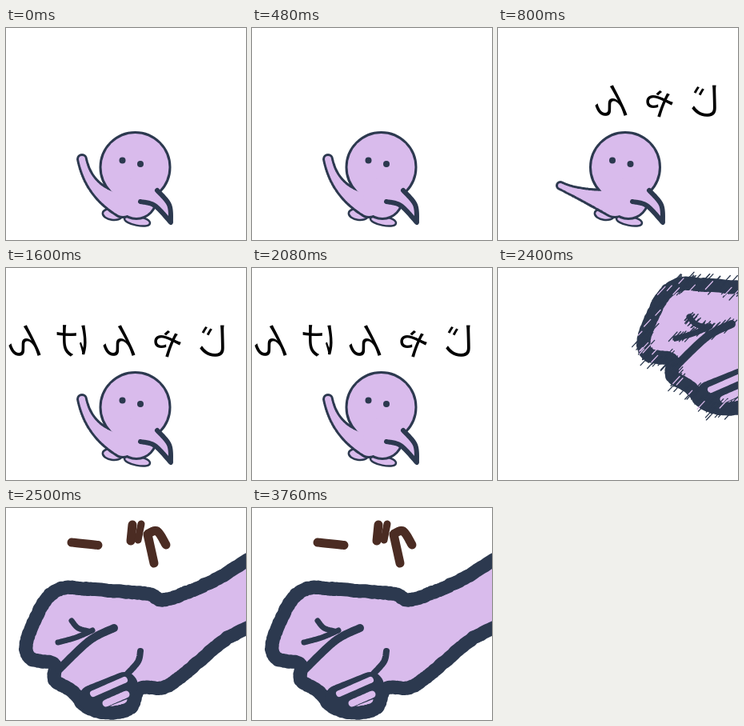
Animation of 300 by 265 pixels, one loop 4.6 s. Source, as an HTML page with a canvas:

```html
<!DOCTYPE html>
<html lang="ja">
<head>
<meta charset="utf-8">
<style>
html, body { margin: 0; height: 100%; overflow: hidden; background: #fff; }
canvas { display: block; }
</style>
</head>
<body>
<canvas width="300" height="265" role="img" aria-label="じゃんけん グー"></canvas>
<script>
const ctx = document.querySelector('canvas').getContext('2d');
const INK = '#2c394f', SKIN = '#d9bbec', BROWN = '#4b2c23';
ctx.lineCap = ctx.lineJoin = 'round';

const seeded = seed => () => (seed = seed * 16807 % 2147483647) / 2147483647;

// Dense points on a Catmull-Rom curve through "x,y x,y ...".
function spline(text, closed) {
  const p = text.split(' ').map(s => s.split(',').map(Number));
  const n = p.length, out = [];
  const at = i => closed ? p[(i + n) % n] : p[Math.max(0, Math.min(n - 1, i))];
  for (let i = 0; i < (closed ? n : n - 1); i++) {
    const [a, b, c, d] = [-1, 0, 1, 2].map(k => at(i + k));
    for (let t = 0; t < 1; t += 1 / 16)
      out.push([0, 1].map(k => b[k] + t / 2 * (c[k] - a[k]
        + t * (2 * a[k] - 5 * b[k] + 4 * c[k] - d[k] + t * (3 * (b[k] - c[k]) + d[k] - a[k])))));
  }
  if (!closed) out.push(p[n - 1]);
  return out;
}

function trace(pts, closed) {
  const path = new Path2D();
  for (const p of pts) path.lineTo(...p);
  if (closed) path.closePath();
  return path;
}

function stroke(path, width, color = INK) {
  ctx.lineWidth = width;
  ctx.strokeStyle = color;
  ctx.stroke(path);
}

function fill(path, color = SKIN) {
  ctx.fillStyle = color;
  ctx.fill(path);
}

const line = (text, width, color) => stroke(trace(spline(text)), width, color);

function ellipse(x, y, rx, ry = rx, turn = 0) {
  const path = new Path2D();
  path.ellipse(x, y, rx, ry, turn, 0, 7);
  return path;
}

// Circles growing along a bend from tip to root.
function limb(tip, bend, root, r0, r1) {
  const path = new Path2D();
  for (let t = 0; t <= 1; t += .02) {
    const [x, y] = [0, 1].map(k =>
      (1 - t) ** 2 * tip[k] + 2 * t * (1 - t) * bend[k] + t * t * root[k]);
    path.addPath(ellipse(x, y, r0 + (r1 - r0) * t * t));
  }
  return path;
}

// Several shapes joined under one outline.
function merged(paths, width) {
  for (const p of paths) stroke(p, width);
  for (const p of paths) fill(p);
}

const ARM_UP = limb([95, 164], [104, 207], [148, 222], 4, 14);
const ARM_OUT = limb([78, 197], [100, 208], [148, 220], 3, 16);
const FEET = [ellipse(133, 233, 11, 5.5, .15), ellipse(164, 241, 15, 4.5, .2)];
const FIN = trace([...spline('168,217 186,222 206,243'), ...spline('206,243 204,221 189,203')]);

function creature(arm, dx) {
  for (const foot of FEET) merged([foot], 5);
  merged([arm, ellipse(161.5 + dx, 174, 42), ellipse(163, 212, 24, 25)], 6);
  fill(FIN);
  stroke(FIN, 6);
  fill(ellipse(145.5 + dx, 165.5, 4), INK);
  fill(ellipse(168 + dx, 170, 4), INK);
}

// The chant is written in mirror image, right to left.
function chant(count) {
  ctx.font = '500 46px "Noto Sans CJK JP", "Noto Sans CJK", sans-serif';
  ctx.textAlign = 'center';
  ctx.fillStyle = '#000';
  [...'じゃんけん'].slice(0, count).forEach((ch, i) => {
    ctx.save();
    ctx.translate(260 - i * 59, 107);
    ctx.scale(-1, 1);
    ctx.fillText(ch, 0, 0);
    ctx.restore();
  });
}

const FIST = spline('330,55 265,88 225,106 195,115 180,108 150,105 100,101 72,100 52,112 36,140 25,172 '
  + '32,189 60,195 61,215 84,230 100,248 126,256 155,250 167,226 198,224 226,205 270,167 330,127', true);
const CREASES = [
  ['82,141 90,150 103,154', 7],
  ['65,168 87,162 108,153', 7],
  ['135,150 104,166 66,202', 10],
  ['168,179 165,192 152,207', 8]
];

// Slanted strokes scattered around a curve.
function hatch(pts, chance, spread, length, color, rand) {
  for (const [px, py] of pts) {
    if (rand() > chance) continue;
    const x = px + (rand() * 2 - 1) * spread, y = py + (rand() * 2 - 1) * spread;
    const l = length * (.4 + rand() * .6) / 2;
    stroke(trace([[x - l * .7, y + l * .75], [x + l * .7, y - l * .75]]), 1.3, color);
  }
}

function fist(smear) {
  const rand = seeded(71);
  const rough = FIST.map(p => p.map(v => v + rand() - .5));
  fill(trace(FIST, true));
  stroke(trace(rough, true), 17);
  line('108,238 148,222', 34);
  line('109,232 148,215', 8, SKIN);
  line('125,244 150,233', 9, SKIN);
  for (const [text, width] of CREASES) line(text, width);
  if (!smear) return;
  hatch(FIST, .8, 10, 18, INK, rand);
  hatch(FIST, .15, 6, 14, SKIN, rand);
  for (const [text, width] of CREASES) hatch(spline(text), .6, width / 2, 16, INK, rand);
}

function shout() {
  line('82,43 115,46.5', 11, BROWN);
  line('158,21 156,41', 11, BROWN);
  line('169,20 165,40', 9, BROWN);
  line('177,33 185,69', 11, BROWN);
  line('178,32 189,29 200,46', 11, BROWN);
}

function draw() {
  const t = performance.now() % 4600;
  ctx.clearRect(0, 0, 300, 265);
  if (t < 2400) {
    const out = t >= 800 && t < 1600;
    creature(out ? ARM_OUT : ARM_UP, out ? -2.5 : 0);
    chant(t < 800 ? 0 : t < 1600 ? 3 : 5);
  } else if (t < 2500) {
    ctx.save();
    ctx.translate(157, -80);
    fist(true);
    ctx.restore();
  } else {
    fist(false);
    shout();
  }
  requestAnimationFrame(draw);
}
draw();
</script>
</body>
</html>
```
